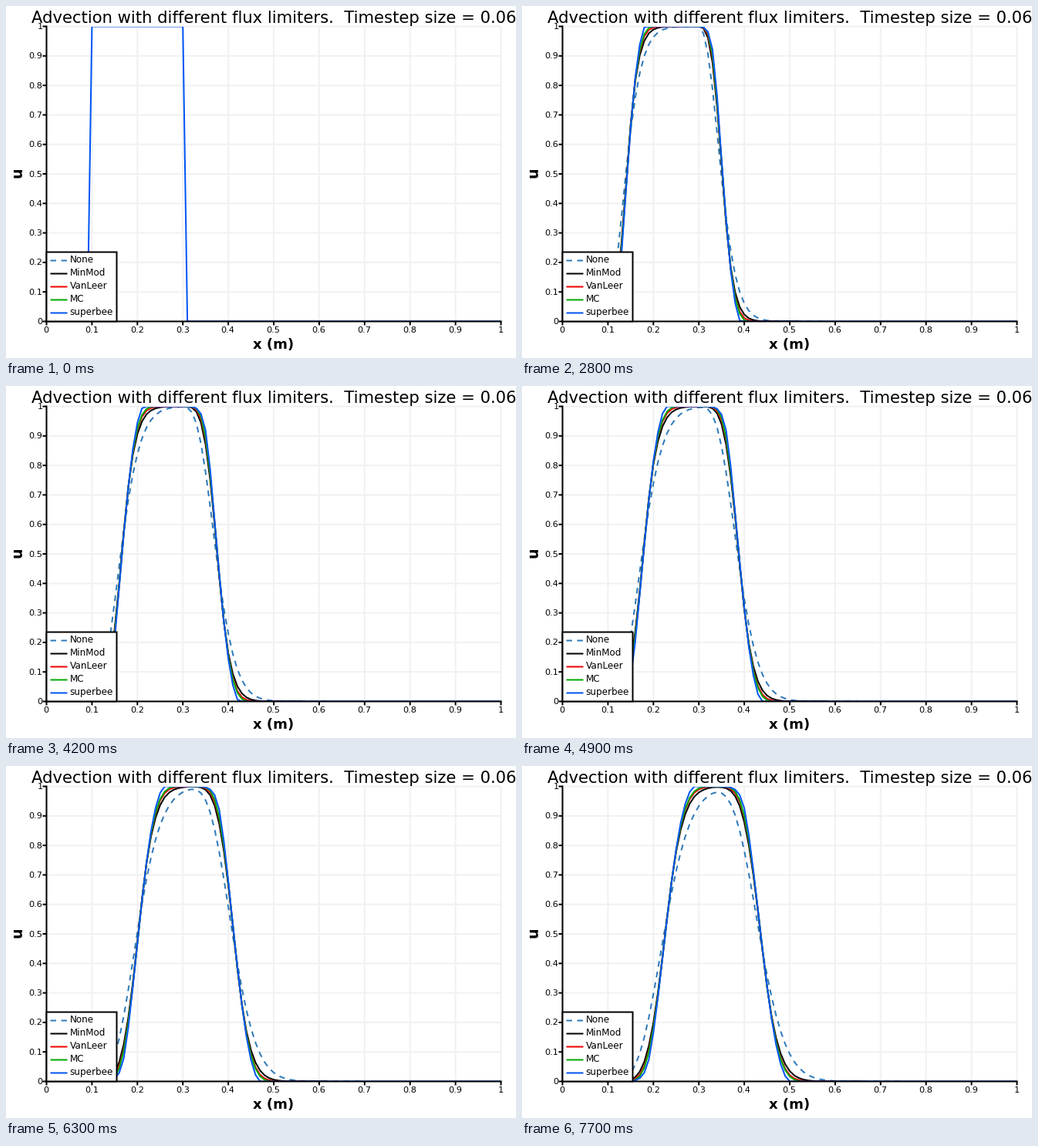
Animation, 661 px wide and 457 px high, one loop 8 s. Source, as a matplotlib script:

```python
import numpy as np
import matplotlib.pyplot as plt
from matplotlib.animation import FuncAnimation
from matplotlib.patches import Rectangle

W, H, DPI = 661, 457, 64
LEFT, RIGHT, TOP, BOTTOM = 52.5, 641.5, 26.5, 409.5
TICK_MS, HOLD_MS, LOOP_MS = 50, 350, 8000
STEPS = (LOOP_MS - 1) // HOLD_MS

N, DX, DT, SPEED = 101, 0.01, 0.06, 0.1
C = SPEED * DT / DX

plt.rcParams["font.family"] = "DejaVu Sans"


def pt(px):
    return px * 72 / DPI


def px_x(x):
    return LEFT + (RIGHT - LEFT) * x


def px_y(u):
    return BOTTOM + (TOP - BOTTOM) * u


# Flux limiters psi(r)
def none(r):
    return np.zeros_like(r)


def minmod(r):
    return np.clip(r, 0, 1)


def van_leer(r):
    return (r + abs(r)) / (1 + abs(r))


def mc(r):
    return np.clip(np.minimum(2 * r, (1 + r) / 2), 0, 2)


def superbee(r):
    return np.maximum(np.clip(2 * r, 0, 1), np.clip(r, 0, 2))


SERIES = [
    ("None", none, "#2f7abb"),
    ("MinMod", minmod, "#000000"),
    ("VanLeer", van_leer, "#f00000"),
    ("MC", mc, "#00a800"),
    ("superbee", superbee, "#0055f5"),
]

x = np.arange(N) * DX
UPWIND_INV = np.linalg.inv((1 + C) * np.eye(N) - C * np.eye(N, k=-1))


def advance(old, psi):
    """Backward Euler step, upwind flux plus iterated TVD correction."""
    u = old
    for _ in range(120):
        d = np.diff(u)
        up = np.r_[0, d[:-1]]
        r = up / np.where(abs(d) < 1e-12, 1e-12, d)
        corr = np.r_[0, 0.5 * psi(r) * d, 0]
        u = 0.5 * u + 0.5 * UPWIND_INV @ (old - C * np.diff(corr))
    return u


def solve(psi):
    i = np.arange(N)
    states = [np.where((i >= 10) & (i <= 30), 1.0, 0.0)]
    for _ in range(STEPS):
        states.append(advance(states[-1], psi))
    return states


def visible(u, top):
    """Drop the stretches fully covered by the topmost curve."""
    differs = abs(u - top) > 1e-6
    near = np.convolve(differs, [1, 1, 1], "same") > 0
    return np.where(near, u, np.nan)


fig = plt.figure(figsize=(W / DPI, H / DPI), dpi=DPI, facecolor="white")
ax = fig.add_axes([0, 0, 1, 1])
ax.set(xlim=(0, W), ylim=(H, 0))
ax.axis("off")


def line(xs, ys, color="black", z=1, dashed=False, width=2):
    style = (0, (3.75, 3.25)) if dashed else "-"
    return ax.plot(xs, ys, color=color, lw=pt(width), ls=style, zorder=z,
                   solid_capstyle="butt", dash_capstyle="butt",
                   solid_joinstyle="round", snap=False)[0]


def label(px, py, s, size, ha="center", va="baseline", **kw):
    ax.text(px, py, s, fontsize=pt(size), ha=ha, va=va, zorder=9, **kw)


# Grid, ticks and axes
for k in range(11):
    gx, gy = px_x(k / 10), px_y(k / 10)
    line([gx, gx], [TOP, BOTTOM], "#f1f1f1")
    line([LEFT, RIGHT], [gy, gy], "#f1f1f1")
    line([gx, gx], [BOTTOM, 414.5], z=5)
    line([47.5, LEFT], [gy, gy], z=5)
    name = f"{k / 10:g}"
    label(gx - 0.5, 424.5, name, 11.3)
    label(47.5, gy + 3.5, name, 11.3, ha="right")
line([LEFT, LEFT], [TOP - 1, BOTTOM + 1], z=5)
line([LEFT - 1, RIGHT + 1], [BOTTOM, BOTTOM], z=5)

label(33, 22, "Advection with different flux limiters.  Timestep size = 0.06",
      21.1, ha="left")
label(346.5, 445, "x (m)", 18, weight="bold")
label(15.5, 216, "u", 19, va="center", weight="bold", rotation=90)

# Curves
area = Rectangle((53, 27), RIGHT - 53, 409 - 27, fc="none", ec="none")
ax.add_patch(area)
curves = []
for name, psi, color in SERIES:
    curve = line(px_x(x), px_y(0 * x), color, z=3, dashed=psi is none)
    curve.set_clip_path(area)
    curves.append((curve, solve(psi)))
top_curve, top_states = curves[-1]

# Legend
ax.add_patch(Rectangle((LEFT, 319.5), 91, BOTTOM - 319.5, fc="white",
                       ec="black", lw=pt(2), zorder=6, snap=False))
for row, (name, psi, color) in enumerate(SERIES):
    y = 330.5 + 17 * row
    line([57.5, 79.5], [y, y], color, z=7, dashed=psi is none)
    label(82.5, y + 2.5, name, 12, ha="left")


def update(i):
    step = min(i * TICK_MS // HOLD_MS, STEPS)
    top = top_states[step]
    for curve, states in curves:
        u = states[step]
        curve.set_ydata(px_y(u if curve is top_curve else visible(u, top)))
    return [curve for curve, _ in curves]


anim = FuncAnimation(fig, update, frames=LOOP_MS // TICK_MS, interval=TICK_MS,
                     repeat=True, repeat_delay=0, blit=False)
plt.show()
```
